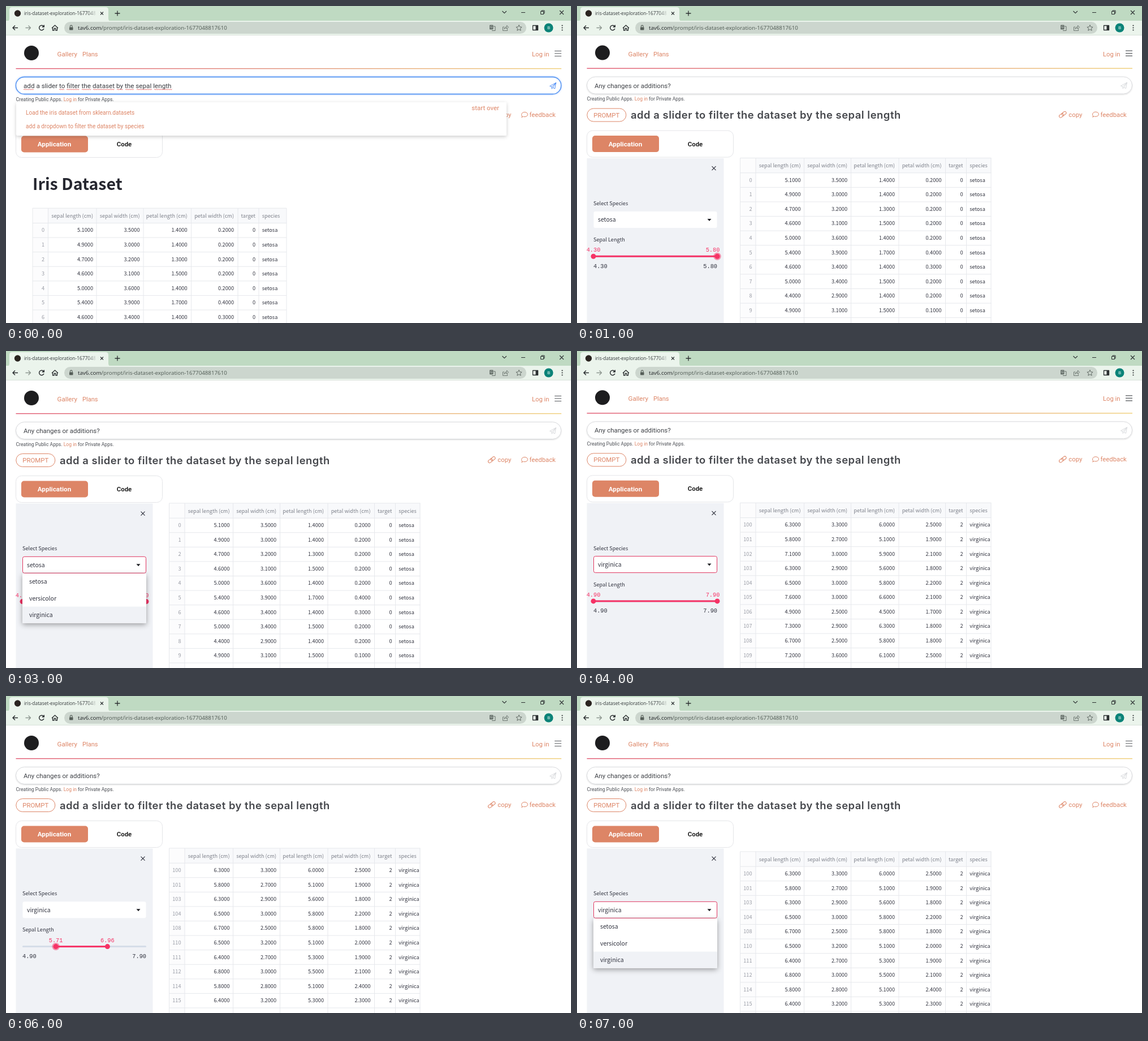
An HTML page for the animation above (8 s loop, 999 by 560 pixels).

```html
<!DOCTYPE html>
<html lang="en">
<head>
<meta charset="utf-8">
<title>Iris dataset exploration</title>
<style>
  html, body { margin: 0; width: 100%; height: 100%; overflow: hidden; background: #fff; }
  svg { display: block; }
  text { white-space: pre; }
  .ui { font-family: "Open Sans", "Noto Sans", sans-serif; }
  .site { font-family: Roboto, sans-serif; }
  .title { font-family: Inter, sans-serif; font-weight: 600; letter-spacing: .53px; }
  .app { font-family: "Noto Sans CJK JP", "Noto Sans CJK SC", "Noto Sans CJK", "Open Sans", sans-serif; }
  .mono { font-family: "Liberation Mono", monospace; }
  .bold { font-weight: 700; }
</style>
</head>
<body>
<svg width="999" height="560" viewBox="0 0 999 560">
  <defs>
    <linearGradient id="rule"><stop stop-color="#e0566f"/><stop offset=".5" stop-color="#e0917a"/><stop offset="1" stop-color="#f0cf78"/></linearGradient>
    <linearGradient id="fade" gradientUnits="userSpaceOnUse" x1="144" x2="161"><stop stop-color="#33383a"/><stop offset="1" stop-color="#33383a" stop-opacity="0"/></linearGradient>
    <filter id="shadow" x="-10%" y="-30%" width="120%" height="170%"><feDropShadow dx="0" dy="2" stdDeviation="3" flood-opacity=".2"/></filter>
    <filter id="deep" x="-15%" y="-30%" width="130%" height="170%"><feDropShadow dx="0" dy="3" stdDeviation="5" flood-opacity=".36"/></filter>
    <filter id="soft" x="-2%" y="-30%" width="104%" height="170%"><feDropShadow dx="0" dy="1" stdDeviation="1.3" flood-opacity=".16"/></filter>
    <filter id="glow" x="-2%" y="-30%" width="104%" height="160%"><feDropShadow dx="0" dy="0" stdDeviation="1.6" flood-color="#4d90fe" flood-opacity=".7"/></filter>
    <clipPath id="tableClip"><path d="M0 0H732.5V570H0Z"/></clipPath>
  </defs>
  <g id="chrome"></g>
  <g id="page"></g>
</svg>
<script>
const CORAL = '#dd8566', PINK = '#f63366', INK = '#31333f', DARK = '#2b2f31';
const PROMPT = 'add a slider to filter the dataset by the sepal length';

// y is the middle of the line; the baseline follows from the size.
const text = (x, y, str, size, cls, fill = INK, anchor = 'start') =>
  `<text x="${x}" y="${y + size * .36}" font-size="${size}" class="${cls}" fill="${fill}" text-anchor="${anchor}">${str}</text>`;
const rect = (x, y, w, h, fill, r = 0, more = '') =>
  `<rect x="${x}" y="${y}" width="${w}" height="${h}" rx="${r}" fill="${fill}" ${more}/>`;
const line = (d, stroke = DARK, width = 1.1, fill = 'none') =>
  `<path d="${d}" stroke="${stroke}" stroke-width="${width}" fill="${fill}" stroke-linejoin="round"/>`;
const circle = (x, y, r, fill, more = '') => `<circle cx="${x}" cy="${y}" r="${r}" fill="${fill}" ${more}/>`;
const shift = (dy, body) => `<g transform="translate(0 ${dy})">${body}</g>`;

// Each row: sepal length, sepal width, petal length, petal width in tenths.
const parse = (first, rows) => rows.split(' ').map((row, i) => ({
  id: first + i,
  values: row.match(/../g).map(v => v / 10)
}));
const DATA = {
  setosa: parse(0, '51351402 49301402 47321302 46311502 50361402 54391704 46341403 50341502 44291402 49311501'),
  versicolor: [],
  virginica: parse(100, '63336025 58275119 71305921 63295618 65305822 76306621 49254517 73296318 67255818 ' +
    '72366125 65325120 64275319 68305521 57255020 58285124 64325323')
};
const SPECIES = Object.keys(DATA);
const RANGE = { setosa: [4.3, 5.8], virginica: [4.9, 7.9] };

// One state per second.
const STATES = [
  { typing: true, species: 'setosa' },
  { species: 'setosa', focus: 1, dy: -.4 },
  { species: 'setosa', focus: 1 },
  { species: 'setosa', open: true },
  { species: 'virginica', selected: true, dy: -.7 },
  { species: 'virginica', range: [4.9, 6.96], focus: 1 },
  { species: 'virginica', range: [5.71, 6.96], focus: 0 },
  { species: 'virginica', range: [5.71, 6.96], open: true, tableDy: 6 }
];

function chrome() {
  const bar = '#ebf4ec';
  return rect(0, 0, 999, 27, '#bfdac2') + rect(0, 26, 999, 26, bar) + rect(0, 51, 999, 1, '#d9e1da') +
    line('M2 27Q6 27 6 22V7Q6 2 11 2H176Q181 2 181 7V22Q181 27 186 27Z', 'none', 0, bar) +
    circle(20.5, 13, 5.7, '#2a2420') +
    text(32, 13, 'iris-dataset-exploration-1677048', 8.4, 'ui', 'url(#fade)') +
    line('M167 10.500l5 5m0-5l-5 5') + line('M192.500 13h9m-4.500-4.500v9', DARK, 1.3) +
    line('M877.500 9l3.700 3.700l3.700-3.700M911 11.500h7M979 8l7 7m0-7l-7 7') +
    line('M945.500 9.500h5v5h-5zM947 9.500V8h5v5h-1.500', DARK, 1) +
    line('M21 38.500H12m4-4l-4 4l4 4', DARK, 1.5) + line('M34.500 38.500h9m-4-4l4 4l-4 4', '#8d9690', 1.3) +
    line('M66.500 36A4.300 4.300 0 1 0 67 40M67.300 33.500v3.500h-3.500', DARK, 1.5) +
    line('M81 39l5.500-5l5.500 5M82.500 38v5h2.700v-3.500h2.600V43h2.700v-5', DARK, 1.3) +
    rect(103, 28, 817, 21, '#ccd6ce', 10.5) +
    rect(112, 37.5, 6.500, 5, '#555e58', .8) + line('M113.400 38v-2a1.800 1.800 0 0 1 3.700 0v2', '#555e58') +
    text(127, 38.500, 'tav6.com<tspan fill="#4f5a53">/prompt/iris-dataset-exploration-1677048817610</tspan>', 9.75, 'ui', '#202426') +
    rect(855, 33.500, 6.500, 8, '#66706a', 1) + line('M862 36h3v7.500h-6', '#66706a', 1) + text(858.2, 37.300, 'G', 6, 'ui', '#e5ece6', 'middle') +
    line('M881 37h-2.500v6.500h8V41M881 41q0-4 4.500-4.300V34.300l3.200 3.200l-3.200 3v-2q-3 0-4.500 2.500Z', '#66706a', .9) +
    line('M907 33.500l1.500 3.400l3.600.4l-2.700 2.400l.8 3.600l-3.200-1.900l-3.200 1.900l.8-3.600l-2.700-2.400l3.600-.4Z', '#555e58', .9) +
    line('M931.500 34.500h9v8h-9z', DARK, 1.3) + rect(936.500, 34.500, 4, 8, DARK) +
    circle(959.5, 38.500, 8, '#0b8378') + text(959.5, 38.500, 'B', 8, 'ui', '#fff', 'middle') +
    [34.5, 38.500, 42.5].map(y => circle(983.5, y, 1.1, DARK)).join('');
}

function squiggles() {
  const words = [[31, 50], [94, 104], [107, 130], [134, 151], [154, 192], [196, 207], [211, 227], [231, 258], [262, 294]];
  return words.map(([a, b]) => {
    let d = `M${a} 148`;
    for (let x = a + 1.5, up = true; x <= b; x += 1.5, up = !up) d += `L${x} ${up ? 146.8 : 148.2}`;
    return line(d, '#e04848', .8);
  }).join('');
}

function header(typing) {
  const plane = typing ? '#4285f4' : '#d4d6da';
  const field = typing
    ? rect(17.500, 125.5, 964, 30, '#fff', 15, 'stroke="#4a8df0" stroke-width="1.3" filter="url(#glow)"') +
      text(31, 141, PROMPT, 11.7, 'site', '#3a3d42') + squiggles()
    : rect(17.500, 125.5, 964, 30, '#fff', 15, 'stroke="#d9dadd" filter="url(#soft)"') +
      text(31, 141, 'Any changes or additions?', 11.5, 'site', '#3f4247');
  return circle(45, 83, 13, '#1d1d1f') +
    text(90.5, 85, 'Gallery', 11.6, 'site', CORAL) + text(135, 85, 'Plans', 11.1, 'site', CORAL) +
    text(930, 85, 'Log in', 11.2, 'site', CORAL) + line('M970 79.500h12m-12 4.500h12m-12 4.500h12', '#55585c', 1.2) +
    rect(17.500, 109.900, 964.5, 1.4, 'url(#rule)') + field +
    line('M961.500 141.500l11-6l-2 10.500l-3.500-1.700l-2 2v-3.300zM965 143l7.500-7.500l-5.500 8.800', plane, .9) +
    text(17.500, 164.600, `Creating Public Apps. <tspan fill="${CORAL}">Log in</tspan> for Private Apps.`, 8.6, 'site', '#4c4f55');
}

function promptRow(typing) {
  const title = typing ? '' :
    rect(17.800, 181.500, 69, 23, '#fff', 11.5, `stroke="${CORAL}"`) +
    text(52.2, 193, 'PROMPT', 11.4, 'site', CORAL, 'middle') +
    text(95, 193, PROMPT, 18.4, 'title', '#45474c');
  const loop = x => rect(x, 189.5, 8.5, 5, 'none', 2.5, `stroke="${CORAL}"`);
  const links =
    `<g transform="rotate(-38 859 192)">${loop(851.5)}${loop(857.5)}</g>` +
    text(869.3, 192, 'copy', 11.3, 'site', CORAL) +
    line('M913 195.500C910 192 912 187.500 917 187.500C924 187.500 924.500 195.500 917 195.700Q915.500 195.700 914.600 195.300L911.500 196.500Z', CORAL, 1) +
    text(925.5, 192, 'feedback', 11.3, 'site', CORAL);
  const tabs = rect(17.500, 220.500, 259, 47, '#fff', 10, 'stroke="#e4e5e8"') +
    rect(27, 229.5, 118, 29, CORAL, 5) +
    text(85.5, 244, 'Application', 11.7, 'site bold', '#fff', 'middle') +
    text(209, 244, 'Code', 11.4, 'site bold', '#222', 'middle');
  return title + links + tabs;
}

const suggestions = () =>
  rect(18, 170, 867, 59, '#fff', 2, 'filter="url(#shadow)"') +
  text(35, 188, 'Load the iris dataset from sklearn.datasets', 10.1, 'site', CORAL) +
  text(35, 212, 'add a dropdown to filter the dataset by species', 10.1, 'site', CORAL) +
  text(872, 180, 'start over', 11.5, 'site', CORAL, 'end');

function table(x, y, species, [low, high]) {
  const pitch = 25.58, border = '#e6e8ec', size = 9.2;
  const ends = [107, 189.5, 273.5, 356, 394];
  const heads = ['sepal length (cm)', 'sepal width (cm)', 'petal length (cm)', 'petal width (cm)', 'target'];
  const rows = DATA[species].filter(r => r.values[0] >= low && r.values[0] <= high).slice(0, 10);
  const rowY = i => y + 13.3 + pitch * (i + 1);
  let out = rect(x, y, 449, 26.5, '#f8f9fb') + rect(x, y, 27.5, 400, '#fcfcfd');
  out += line([0, 27.5, 113, 196, 280.5, 363, 400, 449].map(c => `M${x + c} ${y}V570`).join(''), border, 1);
  out += line([...Array(12).keys()].map(i => `M${x} ${y + i * pitch + (i ? .7 : 0)}h449`).join(''), border, 1);
  heads.forEach((h, i) => out += text(x + ends[i], y + 13.5, h, size, 'app', '#7d808a', 'end'));
  out += text(x + 405.7, y + 13.5, 'species', size, 'app', '#7d808a');
  rows.forEach((row, i) => {
    out += text(x + 21, rowY(i), row.id, size, 'app', '#999ca5', 'end');
    const cells = [...row.values.map(v => v.toFixed(4)), SPECIES.indexOf(species)];
    cells.forEach((c, k) => out += text(x + ends[k], rowY(i), c, size, 'app', INK, 'end'));
    out += text(x + 405.7, rowY(i), species, size, 'app');
  });
  return `<g clip-path="url(#tableClip)">${out}</g>` + (x > 200 ? line(`M732 ${y}V570`, border, 1) : '');
}

function slider([min, max], values, focus) {
  const pos = values.map(v => 29 + 219 * (v - min) / (max - min));
  let out = text(29, 413.300, 'Sepal Length', 9.2, 'app') +
    rect(29, 441.500, 219, 3, '#d5dde8', 1.5) + rect(pos[0], 441.500, pos[1] - pos[0], 3, PINK);
  pos.forEach((x, i) => {
    if (i === focus) out += circle(x, 443, 6.7, PINK, 'opacity=".5"');
    out += circle(x, 443, 4.5, PINK) + text(Math.min(x, 240), 431.3, values[i].toFixed(2), 10.3, 'mono', PINK, 'middle');
  });
  return out + text(29, 459.7, min.toFixed(2), 10.3, 'mono') + text(248, 459.7, max.toFixed(2), 10.3, 'mono', INK, 'end');
}

function options() {
  return rect(29, 393.500, 219, 87.500, '#fff', 2, 'filter="url(#deep)"') + rect(29, 452, 219, 29, '#f0f2f6') +
    SPECIES.map((s, i) => text(41, 408 + i * 29.200, s, 10.5, 'app')).join('');
}

function sidebar({ species, range = RANGE[species], focus, open, selected }) {
  const edge = open || selected ? 'stroke="#e0365f"' : '';
  return rect(17.500, 269.7, 242, 300, '#f0f2f6') + line('M238.500 284l7 7m0-7l-7 7', INK, 1.2) +
    text(29, 349.3, 'Select Species', 9.2, 'app') +
    rect(29.500, 363.700, 218, 29, '#fff', 3, edge) + text(37, 378.500, species, 10.5, 'app') +
    line('M230.500 376.700h7l-3.500 4z', 'none', 0, '#1c1d22') +
    slider(RANGE[species], range, focus) + (open ? options() : '');
}

function page({ typing, tableDy = 0, dy = 0, ...state }) {
  const { species, range = RANGE[species] } = state;
  const body = typing
    ? text(47, 314.300, 'Iris Dataset', 28.6, 'app bold', '#262730') + table(47, 357.2, species, range) + suggestions()
    : shift(-.4, sidebar(state) + table(288.5, 269.3 + tableDy, species, range));
  return shift(dy, header(typing) + promptRow(typing) + body);
}

const pageEl = document.getElementById('page');
document.getElementById('chrome').innerHTML = chrome();
let shown = -1;
function frame() {
  const index = Math.floor(performance.now() % 8000 / 1000);
  if (index !== shown) pageEl.innerHTML = page(STATES[shown = index]);
  requestAnimationFrame(frame);
}
frame();
</script>
</body>
</html>
```
